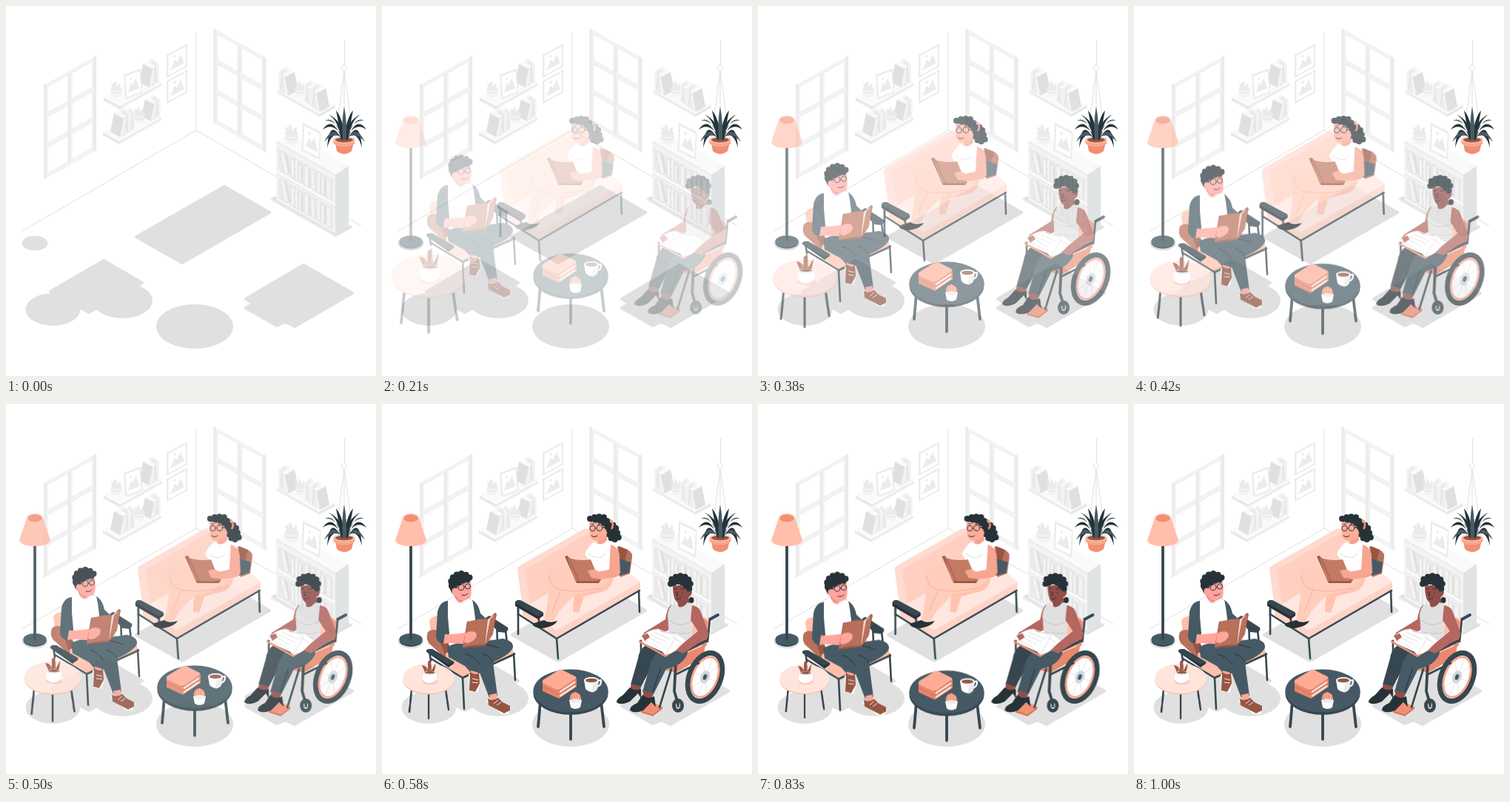
Animation of 500x500 px, one loop 1040 ms. Source, as an HTML page without scripts:

```html
<!DOCTYPE html>
<html lang="en">
<head>
<meta charset="utf-8">
<title>Reading room</title>
<style>
html,body{margin:0;width:100%;height:100%;overflow:hidden;background:#fff}
svg{display:block;width:100vw;height:100vh}
.in{animation:fade 1040ms linear infinite,slide 1040ms linear infinite}
.lamp{animation:fade 1040ms linear infinite}
.side{transform-origin:63px 387px;animation:fade 1040ms linear infinite,shrink 1040ms linear infinite}
.right{--x:1px;--y:0px}
.left{--x:-1px;--y:0px}
.down{--x:0px;--y:1px}
@keyframes fade{0%,5.8%{opacity:0}55.8%,100%{opacity:1}}
@keyframes slide{
0%,5.8%{transform:translate(calc(var(--x)*-34),calc(var(--y)*-34))}
55.8%{transform:none}
60%{transform:none;animation-timing-function:ease-in-out}
79.8%{transform:translate(calc(var(--x)*1.6),calc(var(--y)*1.6));animation-timing-function:ease-in-out}
98%,100%{transform:none}
}
@keyframes shrink{
0%,5.8%{transform:scale(1.6)}
55.8%{transform:none}
60%{transform:none;animation-timing-function:ease-in-out}
79.8%{transform:scale(.97);animation-timing-function:ease-in-out}
98%,100%{transform:none}
}
.w{fill:#fff}.a{fill:#fafafa}.b{fill:#f3f3f3}.c{fill:#ebebeb}.d{fill:#e0e0e0}
.k{fill:#263238}.n{fill:#37474f}.m{fill:#455a64}
.p{fill:#ffbfaa}.q{fill:#ffe4db}.o{fill:#f28f73}.t{fill:#b9705a}.u{fill:#965643}
.l{fill:none;stroke:#37474f;stroke-width:2.6;stroke-linecap:round;stroke-linejoin:round}
.thick{stroke-width:3.8}
.f{fill:none;stroke:#263238;stroke-width:1;stroke-linecap:round}
.e{fill:none;stroke:#e0e0e0;stroke-width:1}
.curl{fill:#263238;stroke:#263238;stroke-width:8;stroke-linecap:round;stroke-dasharray:0 6.5}
</style>
</head>
<body>
<svg viewBox="0 0 500 500">
<defs>
<g id="win">
<path class="b" d="M0 0H71V128H0Z"/>
<path class="c" d="M0 0H3V128H0ZM33 4H36V124H33ZM67 0H71V128H67Z"/>
<path class="w" stroke="#e8e8e8" stroke-width=".8" d="M5 5H33V40H5ZM38 5H66V40H38ZM5 46H33V81H5ZM38 46H66V81H38ZM5 87H33V122H5ZM38 87H66V122H38Z"/>
</g>
<g id="pic">
<path class="c" d="M0 0H28V31H0Z"/>
<path class="w" d="M2.500 2.500H26V29H2.500Z"/>
<path class="c" d="M5 24 11 13 14 17 19 9 24 24Z"/><circle class="c" cx="11" cy="8" r="1.700"/>
</g>
<g id="books">
<path class="b" d="M12 2 17-1 27 6V31L21 35 16 10Z"/>
<path class="c" d="M16 4 20 2 24 28 18 37Z"/>
<path class="a" d="M5 6 10 3 23 10 18 13Z"/>
<path class="b" stroke="#e4e4e4" stroke-width=".6" d="M18 13 22 10 19 35 13 38Z"/>
<path class="d" d="M5 6 18 13 13 38 0 31Z"/>
<path class="e" d="M22 5 24 32"/>
</g>
<g id="pot">
<path class="c" d="M-3-3Q-5-13-2-14Q1-13 1-6L5-11Q8-10 4-2ZM-4-3-8-9Q-8-12-5-10L-1-4Z"/>
<path class="b" d="M-8-3V5Q-5 10 0 10T8 5V-3Z"/>
<ellipse class="c" cy="-3" rx="8" ry="3.500"/><path class="e" d="M-8 1Q0 8 8 1"/>
</g>
<g id="shelf">
<path class="a" d="M0 0 56-33 79-20 22 12Z"/>
<path class="c" d="M0 0 22 12V16L0 4Z"/><path class="b" d="M22 12 79-20V-16L22 16Z"/>
<path class="e" d="M0 1 22 13 79-19" stroke-width=".7"/>
</g>
<g id="row">
<path class="c" d="M0 0H74V29H0Z"/>
<path class="b" stroke="#dedede" stroke-width=".7" d="M2 3 8 0 14 26 8 29ZM17 3H22V29H17ZM22 1H27V29H22ZM27 5H31V29H27ZM35 2H41V29H35ZM43 5 48 2 50 29H45ZM52 1H57V29H52ZM57 4H62V29H57ZM65 2H71V29H65Z"/>
<path class="d" d="M8 0 11 0 17 25 14 26ZM31 6H33V29H31ZM41 3H43V29H41ZM62 5H64V29H62Z"/>
</g>
<g id="fan">
<path class="k" d="M-2 0Q-14-34-28-14Q-13-26 2 0ZM-2 0Q-19-32-22 11Q-15-17 2 0ZM-3 0Q-7-27-20-34Q-3-28 2 0Z"/>
<path class="m" d="M-1 0Q-12-34-25-26Q-10-29 3 0ZM-1 0Q-14-24-26 3Q-13-14 2 0Z"/>
<path class="k" d="M-2 0Q-7-24-10-40Q0-28 2 0Z"/>
</g>
</defs>

<path class="e" d="M257 36V168M22 304 257 168 480 297"/>
<use href="#win" transform="matrix(1 -.563 0 1 51 107)"/>
<use href="#win" transform="matrix(1 .563 0 1 280.500 30)"/>
<use href="#pic" transform="matrix(1 -.54 0 1 217 66)"/>
<use href="#pic" transform="matrix(1 -.54 0 1 217 101)"/>
<use href="#shelf" x="132" y="124"/>
<use href="#books" x="180" y="72"/>
<use href="#pic" transform="matrix(.82 -.3 .08 1.060 159 93)"/>
<use href="#pot" transform="translate(149 114) scale(.9)"/>
<use href="#shelf" x="131" y="171"/>
<use href="#books" transform="translate(154 138) scale(.75 .9)"/><use href="#books" x="141" y="139"/>
<use href="#books" transform="translate(183 121) scale(.95 .9)"/>
<use href="#pot" transform="translate(180 149) scale(.9)"/>

<use href="#shelf" transform="translate(445 134) scale(-1 1)"/>
<use href="#books" transform="translate(395 83) scale(-1 1)"/>
<use href="#pot" transform="translate(398 114) scale(.9)"/>
<use href="#books" transform="translate(425 101) scale(-.8 .9)"/><use href="#books" transform="translate(437 105) scale(-.95 1)"/>

<path class="d" d="M358 260 380 249 467 298 445 311Z"/>
<path class="a" d="M365 183 384 172 463 216 445 228Z"/>
<path fill="#e1e4e4" d="M445 228 463 216V298L445 309Z"/>
<g transform="matrix(1 .565 0 1 365 183)">
<path class="b" d="M0 0H80V79H0Z"/>
<use href="#row" x="3" y="8"/><use href="#row" x="3" y="46"/>
<path class="a" d="M0 39H80V43H0Z"/><path class="e" d="M0 0H80M0 43H80"/>
</g>
<path class="c" d="M358 260 445 309V312L358 263Z"/><path class="d" d="M445 309 467 297V300L445 312Z"/>
<use href="#pic" transform="matrix(.88 .43 -.05 1.200 401 158)"/>
<use href="#pot" transform="translate(386 176) scale(1.150)"/>

<path class="e" d="M457.500 46V80M457 88 445 182M457 88V150M457 88 470 182"/>
<circle class="e" cx="457" cy="84" r="3.500"/>
<path class="o" d="M445 185 447 196Q457 204 467 196L470 185Z"/>
<path fill="#f9a78f" d="M442.500 181V186Q457 195 471.500 186V181Z"/>
<ellipse class="p" cx="457" cy="181" rx="14.500" ry="4.500"/><ellipse class="u" cx="457" cy="181" rx="12" ry="3.200"/>
<use href="#fan" transform="translate(456 181)"/>
<use href="#fan" transform="translate(459 181) scale(-1 1)"/>
<path class="m" d="M455 181Q453 156 457 136Q461 156 460 181Z"/>

<g class="d" stroke="#e0e0e0" stroke-width="4" stroke-linejoin="round">
<path stroke-width="0" d="M21.500 320.500a17.500 10 0 1 0 35 0a17.500 10 0 1 0-35 0M26.500 410a37 22 0 1 0 74 0a37 22 0 1 0-74 0M117 398a40.500 24 0 1 0 81 0a40.500 24 0 1 0-81 0M203 433a52 30 0 1 0 104 0a52 30 0 1 0-104 0"/>
<path d="M60 386 132 344 184 374 112 414ZM176 312 295 244 356 279 238 347ZM324 408 334 402 324 396 402 350 468 388 390 433 378 427 366 432Z"/>
</g>

<g class="lamp">
<ellipse class="n" cx="39" cy="319.500" rx="15.500" ry="8.500"/><ellipse class="m" cx="39" cy="318" rx="15.500" ry="8"/>
<path class="l thick" d="M39 190V317"/>
<path class="p" d="M28 154 18 184Q20 192 39 192T60 184L50 154Z"/>
<ellipse class="p" cx="39" cy="154" rx="11" ry="6"/><ellipse class="o" cx="39" cy="154.500" rx="9.500" ry="5"/>
</g>

<g class="in right">
<path class="l" d="M184 276V311M236 317 238 344M347 252 348 281"/>
<path fill="#ffdace" d="M183 224Q183 220 187 218L271 170Q277 166 284 171L306 184 312 216 214 280 189 268Z"/>
<path fill="#ffd0c1" d="M194 227Q194 223 198 221L280 174Q284 172 287 175L310 216 216 279 200 268Z"/>
<path fill="#ffe7e0" d="M190 276 214 262 308 208 347 238Q351 241 347 244L240 305Q237 307 233 305Z"/>
<path fill="#ffd3c6" d="M190 276 236 306 349 241V250L236 316 190 286Z"/>
<path class="l" d="M184 284 236 317 348 252"/>
<path class="t" d="M318 192 332 197Q339 201 338 207L335 229 322 234Z"/>
<path class="m" d="M319 208 336 214 334 228 320 232Z"/><path class="u" d="M320 192 332 197 328 212 320 207Z"/>
<path class="l" d="M184 270V286M212 288V300"/>
<path class="n" d="M180 270Q179 267 183 265L187 265 217 281Q220 284 216 287L211 290Z"/><path class="k" d="M180 269 211 287 218 283V286L211 291 180 273Z"/>
<path fill="#ffc3ae" d="M312 235Q311 252 292 255L273 260 266 282 258 281Q258 265 261 252Q271 236 284 231Z"/>
<path fill="#ffcdbb" d="M308 238Q294 254 262 257L241 278 232 293 219 293Q226 264 225 243Q220 223 232 220Q252 217 308 224Z"/>
<path d="M226 231Q227 248 242 251Q267 256 296 248M242 251 230 281" fill="none" stroke="#f2ab94" stroke-width=".8"/>
<path class="k" d="M219 292Q225 297 237 293 234 300 218 303 205 303 203 297 210 298ZM258 279Q266 280 269 268 271 281 264 289 257 293 256 288Z"/>
<path class="curl" d="M306 163 315 164 318 174 320 181 312 184 306 177Z"/>
<path fill="#f6a28d" d="M290 174H303L305 191 292 194Z"/>
<path class="w" d="M287 186Q296 194 304 184L313 189Q306 208 311 222 298 233 284 226 278 207 274 203Q278 193 287 186Z"/>
<path d="M279 202Q291 213 302 203M284 225Q298 229 310 222" fill="none" stroke="#ddd"/>
<path fill="#ffad99" d="M280 161Q284 154 301 157L305 171Q303 184 290 185 281 184 281 174Z"/>
<path class="curl" d="M281 155 290 152 300 153 306 160 307 171 304 165 297 158Z"/>
<path d="M308 156Q315 162 310 169" fill="none" stroke="#f28f73" stroke-width="2.500"/>
<path class="f" d="M283 162H286M292 162H295M283 178Q287 181 291 178M298 167 304 166"/>
<circle class="f" cx="284.500" cy="168" r="3.700"/><circle class="f" cx="294" cy="167.500" r="4"/>
<path fill="#f7a58f" d="M309 190Q321 194 321 207L322 228Q319 235 310 235L286 238 282 229 307 224Z"/>
<path class="u" d="M247 206 251 205 265 236 296 237 293 242 263 242Z"/>
<path fill="#c27a63" d="M250 207Q265 213 282 210L294 239Q275 240 261 239Z"/>
<path d="M252 207 266 239" stroke="#9a5844" fill="none"/>
<path fill="#f7a58f" d="M278 226Q288 220 294 229L292 236 283 235Z"/>
</g>

<g class="in down">
<path class="l" d="M155 296 156 322M167 306 169 323M178 337 180 373M109 370 111 412M64 334 66 347"/>
<path class="p" d="M64 294Q65 288 72 287L83 282 98 332 88 341 68 321Z"/>
<path class="t" d="M62 308Q67 303 74 306L89 331 87 345 63 323Q59 316 62 308Z"/>
<path class="u" d="M73 306 78 307 94 330 87 344Z"/>
<path class="p" d="M86 337 134 312 177 331 177 341 111 370 86 354Z"/>
<path class="l" d="M66 344 109 370 179 338"/>
<path class="n" d="M140 289 145 286 170 302Q172 306 166 309L157 308Z"/>
<path fill="#f38d87" d="M98 258H112L115 271 99 275Z"/>
<path class="m" d="M117 262Q130 267 133 283L148 297 143 317 122 301Z"/>
<path class="w" d="M90 266 99 262Q106 274 113 262L122 264Q127 287 128 323L92 331Q85 305 86 284Z"/>
<path d="M99 264Q107 275 114 263" fill="none" stroke="#ddd"/>
<path class="k" d="M90 242 103 230 112 244 102 260Q92 258 90 242Z"/>
<path fill="#ffa59b" d="M100 244Q108 242 110 236L119 236Q122 251 120 260 114 268 104 264L99 259Q93 257 95 250 98 246 101 250Z"/>
<path class="curl" d="M94 246 93 237 99 231 107 229 115 231 120 236 111 238 101 243Z"/>
<path class="f" d="M104 242 108 241M114 241 118 241M108 258Q113 260 116 256M99 248 103 247"/>
<circle class="f" cx="107" cy="247.500" r="4.200"/><circle class="f" cx="116" cy="246.500" r="3.600"/>
<path class="m" d="M88 328Q112 318 130 322L163 317Q178 320 177 329Q174 338 150 349L153 372 156 394 145 397 132 363Q130 356 131 350L132 364 121 364 112 354 90 342Z"/>
<path d="M130 323Q148 326 158 330M131 351Q125 341 114 338M150 349Q147 341 136 338" class="f" stroke-width=".7"/>
<path fill="#ffa59b" d="M120 360 130 363 129 370 119 368ZM145 393 155 391 156 402 147 404Z"/>
<path class="w" d="M117 365H124L133 378 129 390 118 388ZM141 402 144 398 158 402 174 410 171 419 162 419Z"/>
<path class="u" d="M119 362Q125 367 131 364L132 378 126 389 118 387ZM143 398Q150 402 157 397L163 403 173 408 173 414 165 418 144 407Z"/>
<path d="M122 371 130 373M122 376 130 377M151 405 157 400M155 407 161 403" stroke="#fff" stroke-width=".9"/>
<path class="m" d="M89 266Q78 267 75 281L73 313Q73 322 82 324L88 320 91 310 89 287Z"/>
<path fill="#ffa59b" d="M85 311Q101 312 117 308L126 315 120 325 91 323 83 324Z"/>
<path class="u" d="M115 294 144 290 153 282 155 284 149 312 139 327 109 330Z"/>
<path class="t" d="M116 295Q130 289 143 291L138 325Q122 325 109 329Z"/>
<path fill="#f3d6ca" d="M143 291 151 285 147 311 139 324Z"/><path class="t" d="M146 291 154 283 150 311 139 327Z"/>
<path fill="#ffa59b" d="M112 310Q121 305 127 309 130 315 123 320 116 325 111 322Z"/>
<path class="n" d="M60 335Q59 332 63 331L68 331 97 348Q99 351 92 354L88 354Z"/><path class="k" d="M60 335 89 352 98 349 90 356Z"/>
</g>

<g class="side">
<path class="l" d="M40 386 37 416M63 391V425M86 386 90 413"/>
<ellipse cx="63" cy="372.500" rx="35" ry="20" fill="#f9c3b2"/><ellipse class="q" cx="63" cy="371" rx="35" ry="20"/>
<ellipse cx="65" cy="375" rx="10" ry="4" fill="#f8cabb"/>
<path class="u" d="M59 365 54 353Q61 354 62 360L62 348 66 345 67 360 73 349 70 365Z"/>
<path class="t" d="M60 364 58 355 64 363 66 350 67 364Z"/>
<path class="w" d="M55 363V372Q58 377 64 377T74 372V363Z"/><ellipse class="c" cx="64.500" cy="363.500" rx="9.500" ry="2.600"/>
<path class="u" d="M57 363Q65 359 72 363 65 366 57 363Z"/>
</g>

<g class="in left">
<path class="l thick" d="M443 291 454 285"/>
<path class="p" d="M421 292 436 288Q441 291 440 298L438 327 414 340Z"/>
<path class="o" d="M435 290 441 294 439 326 432 332Z"/>
<path class="l" d="M443 291 440 321M350 318V346"/>
<path fill="#e8896d" d="M372 350 420 333 437 326 434 342 397 363 375 358Z"/>
<path class="o" d="M350 414 365 403 379 409 366 419Z"/><path fill="#d97757" d="M350 414 366 419 379 409V412L366 422 350 417Z"/>
<path class="l" d="M391 358 375 410"/>
<g transform="rotate(22 436.500 369)">
<ellipse class="w" cx="436.500" cy="369" rx="21" ry="34" stroke="#37474f" stroke-width="7"/>
<ellipse cx="436.500" cy="369" rx="16.500" ry="28.500" fill="none" stroke="#f6a48e" stroke-width="2.800"/>
<path d="M436.500 342V396M421 369H452M426 349 447 389M447 349 426 389" stroke="#e0e0e0" stroke-width=".8"/>
<ellipse cx="436.500" cy="369" rx="6" ry="9" fill="#cfd8dc"/><ellipse class="m" cx="436.500" cy="369" rx="2.500" ry="4"/>
</g>
<ellipse class="w" cx="400" cy="407.500" rx="5.500" ry="7" stroke="#37474f" stroke-width="5"/><ellipse class="m" cx="400" cy="407.500" rx="2" ry="3"/>
<path class="l thick" d="M438 320 401 338Q397 341 397 348L395 388 400 405"/><path class="l" d="M396 366 428 350"/>
<path fill="#b4665f" d="M391 271Q385 276 383 291L354 309 350 318 360 322 391 303Z"/>
<path fill="#924d48" d="M398 258H414L416 276 402 283Z"/>
<path class="d" d="M395 268Q403 281 413 268L420 272Q420 294 419 323L387 318Q388 304 386 287 386 276 395 268Z"/>
<path d="M387 291Q400 304 418 294M391 308Q402 312 417 309" fill="none" stroke="#c8c8c8"/>
<path fill="#924d48" d="M393 245Q402 247 407 241Q410 247 413 252 418 248 419 254 418 260 414 261 409 270 399 268 393 263 393 245Z"/>
<path class="curl" d="M390 243 391 237 398 233 406 232 413 235 417 242 415 250 410 245 404 239Z"/>
<path class="f" d="M395 250 398 249M404 250 408 250M397 254V255M406 255V256M397 263Q401 265 404 262M400 254 398 259H400"/>
<ellipse class="k" cx="418" cy="265" rx="3.500" ry="4"/>
<path class="n" d="M357 325Q347 333 346 344L336 379 349 384 369 346 390 340Z"/>
<path class="m" d="M410 323 372 336Q363 344 361 357L352 389 366 394 384 358Q406 354 413 337Z"/>
<path d="M366 389 376 358" class="f"/>
<path fill="#924d48" d="M337 378 350 382 348 389 335 386ZM354 387 366 391 365 399 352 397Z"/>
<path class="k" d="M335 383Q342 389 350 385L350 398 346 391 335 402Q322 408 317 403 317 398 325 394ZM352 393Q359 400 368 395L370 409 364 403 353 414Q341 419 335 414 335 408 345 404Z"/>
<path class="o" d="M347 319 383 339 411 321V324L383 342 347 322Z"/>
<path class="w" stroke="#dedede" stroke-width=".7" d="M348 318Q358 305 373 304Q383 312 398 310L411 320Q400 335 383 339 371 324 348 318Z"/>
<path class="e" d="M373 304 398 313 383 339M358 314 378 325M362 311 385 322M367 308 390 318M391 314 404 322" stroke-width=".8"/>
<path fill="#b4665f" d="M419 272Q429 273 432 284L441 309Q442 317 434 319L407 337 397 333 405 325 427 307 417 292ZM351 313 359 310 362 315 355 320Z"/>
</g>

<g class="in down">
<path class="l thick" d="M214 402 211 436M255 412V453M296 402 300 436"/>
<path class="n" d="M204.500 387V391A50.500 29 0 0 0 305.500 391V387Z"/>
<ellipse class="m" cx="255" cy="387.500" rx="50.500" ry="29"/>
<path fill="#e8846a" d="M217 376 239 387 263 371V382L239 398 217 388Z"/>
<path d="M240 389.500 261 375.500M240 395 261 381" fill="none" stroke="#ffe4db" stroke-width="2.400"/>
<path d="M217 381.500 239 392.500 263 376.500" fill="none" stroke="#b9705a" stroke-width=".8"/>
<path fill="#ffab95" d="M217 377Q216 374 219 372L238 360Q240 358 243 359L261 368Q264 370 261 372L242 385Q239 387 236 386Z"/>
<path d="M293 374Q298 371 295 379 292 383 289 381" fill="none" stroke="#fff" stroke-width="2.200"/>
<path class="w" d="M273 373 275 385Q283 393 291 385L293 373Z"/><path class="c" d="M285 378 293 373 291 385Q289 389 283 390Z"/>
<ellipse class="w" cx="283" cy="373" rx="10" ry="4"/><ellipse class="u" cx="283" cy="373.500" rx="8" ry="2.700"/>
<path class="o" d="M254 401Q252 391 261 389Q270 391 269 401Z"/><path d="M258 392 259 402M262 390V402M266 392 265 402" stroke="#ffc3b0" stroke-width="1.200"/>
<path class="w" d="M253 400 255 410Q261 414 268 410L270 400Z"/><ellipse class="c" cx="261.500" cy="401" rx="8.500" ry="2.500"/>
</g>
</svg>
</body>
</html>
```
